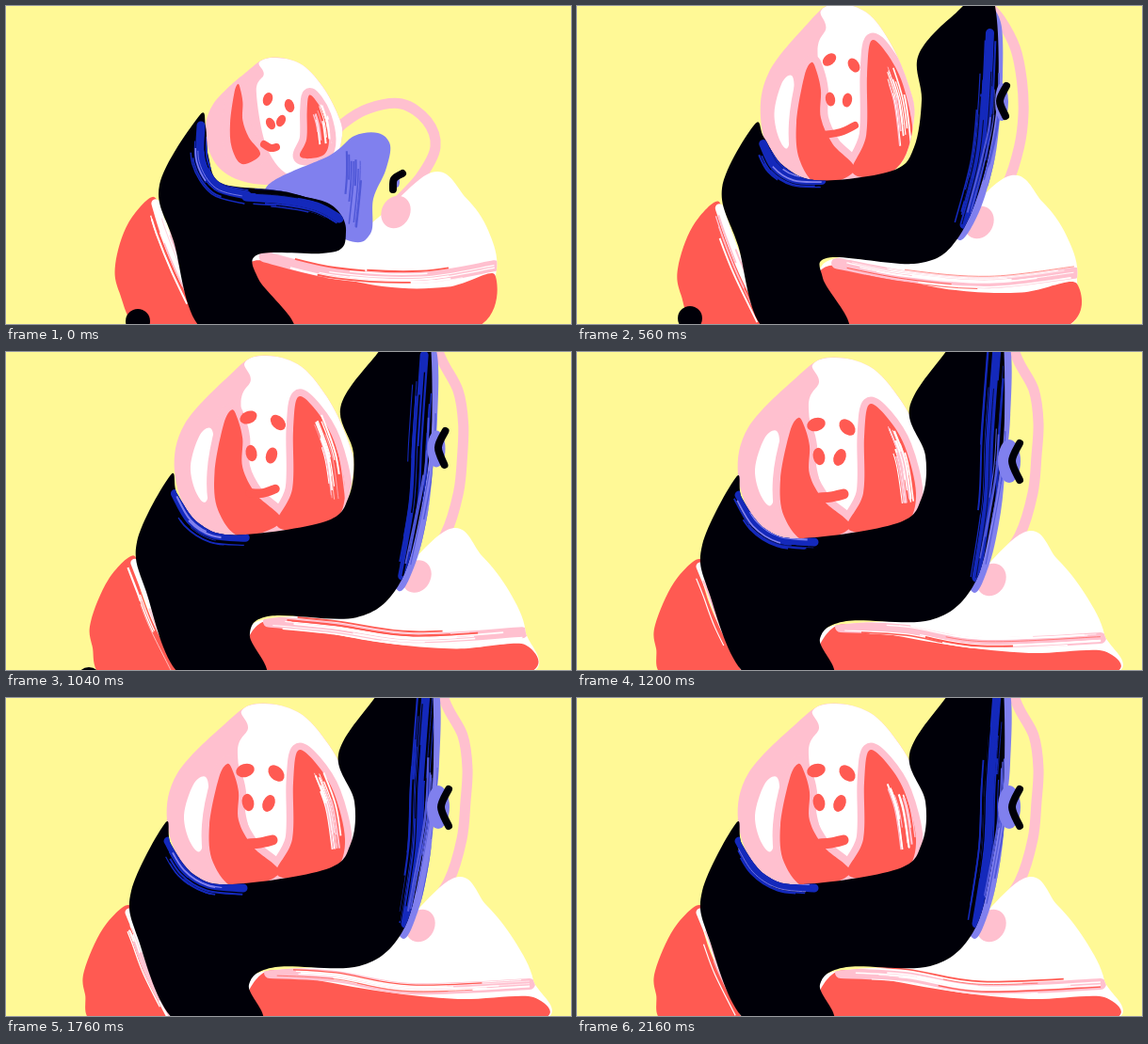
An HTML page with a canvas for the animation above (2.24 s loop, 600 by 338 pixels).

```html
<!DOCTYPE html>
<html>
<head>
<meta charset="utf-8">
<style>
html, body { margin: 0; width: 100%; height: 100%; overflow: hidden; background: #fff996; }
canvas { display: block; width: 600px; height: 338px; }
</style>
</head>
<body>
<canvas id="stage" width="600" height="338"></canvas>
<script>
const ctx = document.getElementById('stage').getContext('2d');
const STEP = 80, FRAMES = 28;
const KEYS = [0, 240, 560, 880, 1200];
// How far body and raised arm have moved from the upright to the final pose at each key.
const LEAN = [-.07, 0, .22, .55, 1], REACH = [0, 0, .5, .75, 1];
const YELLOW = '#fff996', PINK = '#ffc0cf', RED = '#ff5a52', WHITE = '#fff',
  BLACK = '#000008', BLUE = '#1429bb', LILAC = '#8080ee';

let key = 0, mix = 0, seed = 1;

const blend = pose => {
  const to = pose(Math.min(key + 1, 4));
  return pose(key).map((v, i) => v + (to[i] - v) * mix);
};
// One list per key.
const track = (...poses) => () => blend(k => poses[k]);
// Upright pose a, final pose b, and an optional opening pose.
const morph = (a, b, first) => () => blend(k => k === 0 && first ? first
  : a.map((v, i) => v + (b[i] - v) * (first && a[i & ~1] > 300 ? REACH : LEAN)[k]));
// Final pose squeezed into a moving box: left, top, right, bottom.
const fit = (points, box, home) => () => {
  const b = box();
  return points.map((v, i) => {
    const j = i % 2;
    return b[j] + (v - home[j]) / (home[j + 2] - home[j]) * (b[j + 2] - b[j]);
  });
};

// Head
const headHome = [171, 6, 373, 205];
const headBox = track([212,55,357,188], [195,14,364,182], [195,-2,358,192], [187,2,365,197], headHome);
const inHead = points => fit(points, headBox, headHome);
const head = inHead([265,6, 310,15, 343,50, 366,95, 373,130, 355,180, 300,205, 235,205, 190,180, 171,130, 182,80, 232,28]);
const face = inHead([270,6, 310,14, 343,50, 366,95, 373,130, 357,180, 300,195, 262,150, 246,60, 257,32, 250,14]);
const patch = inHead([212,84, 215,105, 208,160, 196,154, 189,125, 199,92]);

const leftHome = [216, 70, 290, 202];
const leftBox = track([238,83,270,168], [238,60,285,172], [233,60,295,190], [227,53,295,190], leftHome);
const leftCheek = fit([235,70, 241,78, 247,100, 247,130, 262,158, 290,186, 245,202, 220,175, 216,135, 226,85], leftBox, leftHome);

const rightHome = [287, 56, 360, 192];
const rightBox = track([312,95,343,162], [304,66,350,160], [292,37,357,182], [287,40,360,187], rightHome);
const inRight = points => fit(points, rightBox, rightHome);
const rightCheek = inRight([310,56, 328,68, 348,100, 360,150, 350,182, 315,192, 287,186, 304,150, 305,90]);
const cheekShine = inRight([330,75, 345,115, 352,160]);

// Eyes and nostrils: x, y, tilt
const eyes = [
  track([278,99,1.9], [269,72,-.4], [268,57,-.7], [261,62,-.5], [254,77,-.3]),
  track([301,106,1.3], [300,74,.2], [294,63,1], [291,70,.8], [287,80,.8])];
const nostrils = [
  track([281,125,-.5], [277,99,-.3], [269,99,-.2], [264,104,-.2], [257,111,-.2]),
  track([292,122,.5], [292,100,.3], [287,100,.2], [285,108,.2], [279,112,.4])];
const mouth = track(
  [274,147, 281,151, 287,150], [264,135, 285,133, 298,126], [262,137, 280,134, 295,127],
  [260,145, 275,146, 289,140], [258,155, 270,154, 283,151]);

// Thin arm
const thinArm = morph(
  [415,30, 432,22, 446,50, 455,85, 460,120, 455,150, 443,185, 425,215],
  [450,-40, 468,8, 485,40, 490,75, 488,110, 484,150, 470,195, 442,235],
  [340,145, 358,125, 385,109, 420,104, 447,122, 456,150, 440,182, 412,212]);
const hand = track([414,219], [418,222], [427,230], [432,235], [440,242]);

// Legs
const rightLeg = morph(
  [453,178, 490,205, 514,240, 523,285, 495,345, 300,345, 260,270, 370,245],
  [474,192, 510,220, 540,258, 560,300, 558,345, 280,345, 262,295, 380,275]);
const rightRed = morph(
  [265,272, 300,278, 400,299, 470,300, 522,288, 495,345, 300,345, 258,288],
  [278,290, 320,298, 400,312, 480,320, 560,318, 550,345, 270,345, 256,318]);
const rightBand = morph(
  [275,268, 350,285, 440,290, 521,278], [280,292, 350,296, 430,309, 556,304]);
const leftRed = morph(
  [155,204, 163,235, 180,285, 205,345, 140,345, 118,305, 114,275, 128,232],
  [130,220, 135,250, 148,285, 180,345, 95,345, 84,315, 83,290, 103,245]);
const leftBand = morph(
  [157,211, 166,240, 182,280, 206,330], [131,228, 142,255, 155,290, 179,338]);
const foot = track([140,335], [134,333], [120,332], [100,338], [76,358]);

// Big arm
const armUp = [194,124, 205,135, 225,165, 262,182, 330,168, 350,145, 362,90, 372,45, 410,17, 435,32,
  441,90, 428,165, 390,242, 350,262, 264,262, 262,285, 305,345, 206,345, 180,255, 160,190];
const armEnd = [169,133, 175,155, 200,188, 240,198, 340,182, 366,155, 370,110, 353,60, 390,2, 444,-60,
  454,70, 440,180, 420,250, 375,285, 286,286, 258,305, 270,345, 182,345, 140,255, 133,205];
const armLow = [205,117, 212,128, 215,160, 228,188, 280,195, 300,198, 318,203, 332,206, 343,210, 352,217,
  359,228, 361,240, 357,257, 335,263, 268,264, 268,290, 305,345, 210,345, 178,250, 163,190];
const bigArm = morph(armUp, armEnd, armLow);
const armEdge = morph(
  [405,60, 425,30, 440,40, 444,80, 442,130, 435,165, 415,215, 390,242, 385,200],
  [400,0, 440,-30, 460,-5, 460,70, 455,120, 450,170, 438,225, 420,255, 400,190],
  [345,158, 370,138, 395,135, 408,148, 403,175, 390,205, 387,242, 360,248, 275,198]);
const shoulderShine = morph(
  [205,145, 215,167, 235,180, 262,181], [172,152, 190,182, 215,198, 252,202],
  [207,127, 207,165, 224,192, 256,201]);
const forearmShine = morph(
  [431,62, 431,115, 421,170, 398,225], [446,-5, 439,90, 436,160, 424,240],
  [255,203, 295,206, 330,213, 354,226]);
const elbowShine = morph(
  [442,80, 440,130, 412,215], [456,60, 452,130, 434,228], [372,150, 372,185, 367,235]);
const crescent = track(
  [411,195, 412,184, 421,178], [450,106, 444,122, 449,138], [456,85, 449,101, 455,117],
  [463,71, 456,87, 461,104], [470,97, 462,116, 470,136]);
const crescentBack = track([415,187,3,6], [440,122,4,14], [451,102,7,20], [455,90,7,16], [459,116,12,23]);

function rand() {
  seed = (seed * 16807) % 2147483647;
  return seed / 2147483647;
}

// Smooth path through points given as x, y pairs.
function spline(p, closed) {
  const n = p.length / 2;
  const at = i => {
    i = closed ? (i + n) % n : Math.max(0, Math.min(n - 1, i));
    return [p[2 * i], p[2 * i + 1]];
  };
  const path = new Path2D();
  path.moveTo(p[0], p[1]);
  for (let i = 0; i < (closed ? n : n - 1); i++) {
    const [a, b, c, d] = [at(i - 1), at(i), at(i + 1), at(i + 2)];
    path.bezierCurveTo(b[0] + (c[0] - a[0]) / 6, b[1] + (c[1] - a[1]) / 6,
      c[0] - (d[0] - b[0]) / 6, c[1] - (d[1] - b[1]) / 6, c[0], c[1]);
  }
  return path;
}

function blob(shape, color) {
  ctx.fillStyle = color;
  ctx.fill(spline(shape(), true));
}

function line(shape, color, width, closed) {
  ctx.strokeStyle = color;
  ctx.lineWidth = width;
  ctx.stroke(spline(shape(), closed));
}

function oval(x, y, rx, ry, tilt, color) {
  ctx.fillStyle = color;
  ctx.beginPath();
  ctx.ellipse(x, y, rx, ry, tilt, 0, 2 * Math.PI);
  ctx.fill();
}

function within(shape, paint) {
  ctx.save();
  ctx.clip(spline(shape(), true));
  paint();
  ctx.restore();
}

// Dry-brush bristles spread across a path.
function brush(shape, color, width, count) {
  const p = shape(), last = p.length - 2;
  let length = 0;
  for (let i = 0; i < last; i += 2) length += Math.hypot(p[i + 2] - p[i], p[i + 3] - p[i + 1]);
  ctx.save();
  ctx.strokeStyle = color;
  ctx.lineCap = 'butt';
  for (let k = 0; k < count; k++) {
    const off = (rand() - .5) * width;
    const q = p.slice();
    for (let i = 0; i <= last; i += 2) {
      const a = Math.max(0, i - 2), b = Math.min(last, i + 2);
      const dx = p[b] - p[a], dy = p[b + 1] - p[a + 1], d = Math.hypot(dx, dy) || 1;
      q[i] -= dy / d * off;
      q[i + 1] += dx / d * off;
    }
    ctx.lineWidth = .6 + rand() * 1.6;
    ctx.setLineDash([length * (.3 + rand() * .6), length * 3]);
    ctx.lineDashOffset = -length * rand() * .45;
    ctx.stroke(spline(q));
  }
  ctx.restore();
}

function drawHead(time) {
  blob(head, PINK);
  within(head, () => {
    blob(face, WHITE);
    if (time > STEP) blob(patch, WHITE);
    line(leftCheek, PINK, 16, true);
    line(rightCheek, PINK, 15, true);
    blob(leftCheek, RED);
    blob(rightCheek, RED);
    brush(cheekShine, WHITE, 14, 9);
    brush(cheekShine, PINK, 18, 4);
  });
  const box = headBox(), size = (box[2] - box[0]) / 202;
  const dot = (shape, rx, ry) => {
    const [x, y, tilt] = shape();
    oval(x, y, rx * size, ry * size, tilt, RED);
  };
  eyes.forEach(e => dot(e, 10, 7));
  nostrils.forEach(n => dot(n, 6.3, 9.3));
  line(mouth, RED, 8 + 3 * Math.max(0, (Math.min(time, 1200) - 880) / 320));
}

function drawLegs() {
  blob(rightLeg, WHITE);
  blob(rightRed, RED);
  within(rightLeg, () => {
    line(rightBand, PINK, 12);
    brush(rightBand, WHITE, 13, 9);
    brush(rightBand, RED, 16, 3);
  });
  blob(leftRed, RED);
  line(leftBand, WHITE, 9);
  brush(leftBand, WHITE, 20, 10);
  brush(leftBand, PINK, 16, 4);
  oval(...foot(), 13, 13, 0, BLACK);
}

function drawArm() {
  blob(armEdge, LILAC);
  blob(bigArm, BLACK);
  within(bigArm, () => {
    line(shoulderShine, BLUE, 9);
    brush(shoulderShine, BLUE, 20, 14);
    brush(shoulderShine, LILAC, 9, 2);
    line(forearmShine, BLUE, 9);
    brush(forearmShine, BLUE, 21, 14);
    brush(forearmShine, BLACK, 14, 4);
  });
  within(armEdge, () => brush(elbowShine, '#5058d8', 22, 8));
  oval(...crescentBack(), 0, LILAC);
  line(crescent, BLACK, 8);
}

function draw(frame) {
  const time = frame * STEP;
  key = KEYS.filter(k => k <= time).length - 1;
  mix = key < 4 ? (time - KEYS[key]) / (KEYS[key + 1] - KEYS[key]) : 0;
  seed = 7919 * (frame + 3);
  ctx.lineCap = ctx.lineJoin = 'round';
  ctx.fillStyle = YELLOW;
  ctx.fillRect(0, 0, 600, 338);
  line(thinArm, PINK, 11);
  drawHead(time);
  drawLegs();
  oval(...hand(), 15, 18, .5, PINK);
  drawArm();
}

function tick() {
  draw(Math.floor(performance.now() / STEP) % FRAMES);
  requestAnimationFrame(tick);
}
tick();
</script>
</body>
</html>
```
